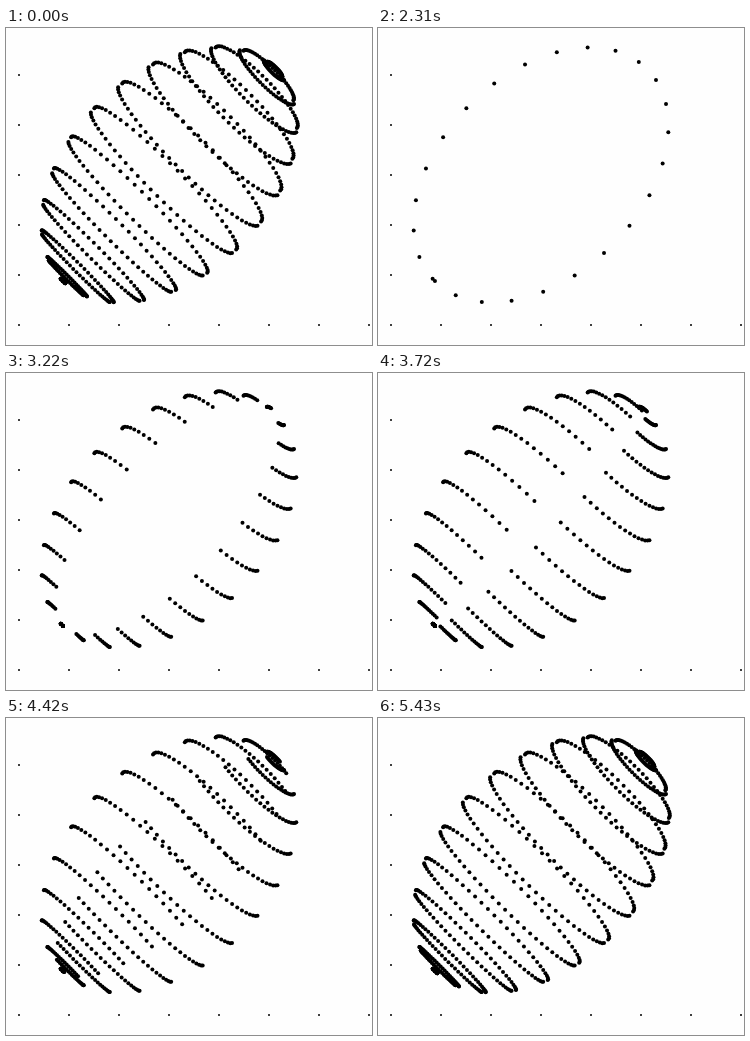
An HTML page with a canvas for the animation above (8280 ms loop, 366 by 317 pixels).

```html
<!DOCTYPE html>
<html lang="en">
<head>
<meta charset="utf-8">
<title>Rotating ellipse</title>
<style>
  html, body { margin: 0; width: 100%; height: 100%; overflow: hidden; background: #fefefe; }
  canvas { display: block; }
</style>
</head>
<body>
<canvas id="stage" width="366" height="317"></canvas>
<script>
const ctx = document.getElementById('stage').getContext('2d');
const LOOP = 8280, CLEAR_AT = 2310, STEP_FROM = 2320, STEP_MS = 100, LAST_TURN = 31;
const UNIT = 50, ORIGIN = { x: 13, y: 297 }, EYE = 30;

function dot(x, y, z, radius) {
  const scale = UNIT * EYE / (EYE + z);
  ctx.beginPath();
  ctx.arc(ORIGIN.x + x * scale, ORIGIN.y - y * scale, radius, 0, 2 * Math.PI);
  ctx.fill();
}

function drawTicks() {
  for (let i = 0; i <= 7; i++) dot(i, 0, 0, 1);
  for (let i = 1; i <= 5; i++) dot(0, i, 0, 1);
}

// Ellipse with half axes 3 and 2, tilted by 45 degrees and turned about its long axis.
function drawEllipse(turn) {
  for (let t = 0; t < 2 * Math.PI; t += 0.25) {
    const along = -3 * Math.cos(t) * Math.SQRT1_2;
    const across = 2 * Math.sin(t) * Math.cos(turn) * Math.SQRT1_2;
    dot(3 + along + across, 3 + along - across, 2 * Math.sin(t) * Math.sin(turn), 2);
  }
}

function draw(time) {
  const steps = Math.floor((time - STEP_FROM) / STEP_MS);
  const turns = time < CLEAR_AT ? LAST_TURN : Math.min(LAST_TURN, Math.max(0, steps));
  ctx.fillStyle = '#fefefe';
  ctx.fillRect(0, 0, 366, 317);
  ctx.fillStyle = '#000';
  drawTicks();
  for (let i = 0; i <= turns; i++) drawEllipse(i / 10);
}

const start = performance.now();
function tick() {
  draw((performance.now() - start) % LOOP);
  requestAnimationFrame(tick);
}
tick();
</script>
</body>
</html>
```
